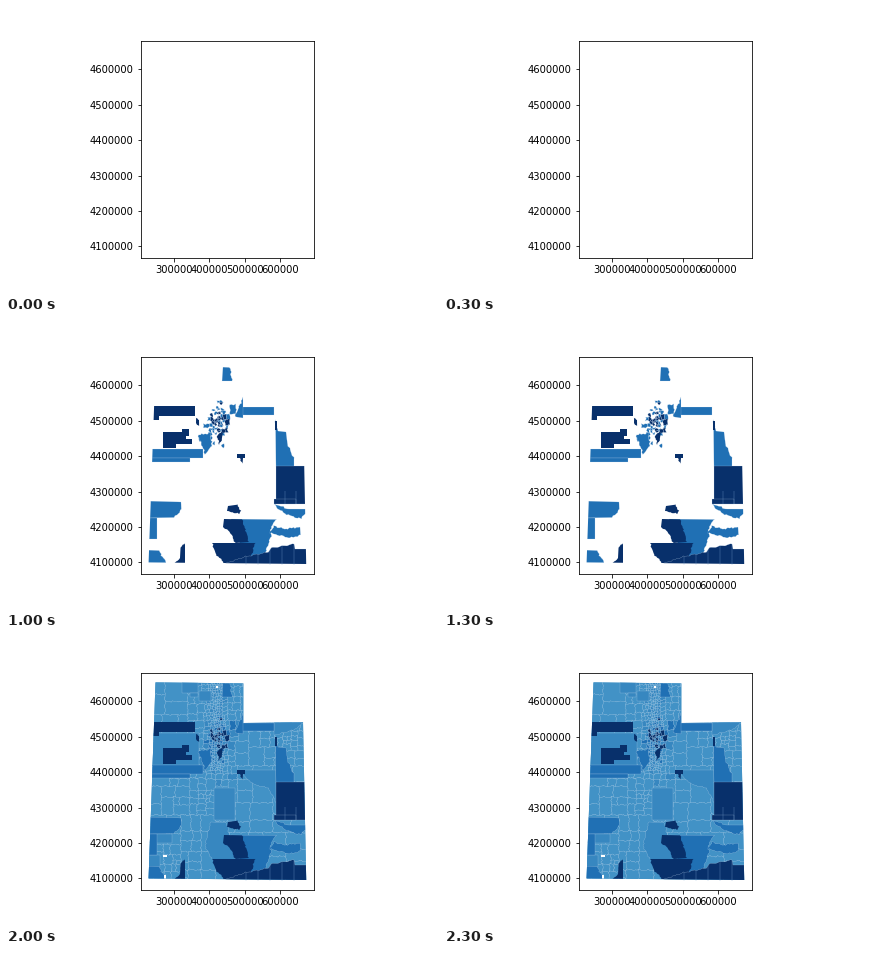
Animation of 432 by 288 pixels, one loop 2500 ms. Source, as a matplotlib script:

```python
import numpy as np
import matplotlib.pyplot as plt
from matplotlib.animation import FuncAnimation
from matplotlib.patches import Polygon

plt.rcParams.update({"font.family": "DejaVu Sans", "font.size": 10})
rng = np.random.default_rng(12)

# One shade is added per step: darkest first, palest last.
SHADES = {1: "#08306b", 2: "#2070b4", 3: "#3787c0", 4: "#4292c6"}
SEAM = "#c6dbef"
layers = {step: [] for step in SHADES}

# Axes units are stage pixels; tick labels carry the projected coordinates.
LEFT, RIGHT, TOP, BOTTOM = 134.75, 308.05, 34.56, 252
TICK = 35.373
fig = plt.figure(figsize=(6, 4), dpi=72, facecolor="white")
ax = fig.add_axes([LEFT / 432, 1 - BOTTOM / 288,
                   (RIGHT - LEFT) / 432, (BOTTOM - TOP) / 288])
ax.set(xlim=(LEFT, RIGHT), ylim=(BOTTOM, TOP))
ax.set_xticks([167.89 + TICK * k for k in range(4)],
              [str(300000 + 100000 * k) for k in range(4)])
ax.set_yticks([240.26 - TICK * k for k in range(6)],
              [str(4100000 + 100000 * k) for k in range(6)])

state = Polygon([(149.5, 44.4), (237.3, 45.4), (237.3, 85), (297, 84.3),
                 (300.2, 242), (142.6, 240.4)], color=SHADES[4], lw=0, zorder=0.05)
layers[4].append(ax.add_patch(state))


def wiggle(p):
    """Shift points by a fixed field, so that neighbours keep shared borders."""
    x, y = p.T
    return p + 0.45 * np.column_stack([np.sin(1.7 * y + x) + np.sin(0.8 * y),
                                       np.sin(1.5 * x - y) + np.sin(0.7 * x)])


def border(points, straight):
    """Follow the corners; slanted edges, or all of them, become ragged."""
    pts = np.array(points, float)
    out = []
    for a, b in zip(pts, np.roll(pts, -1, axis=0)):
        edge = a + (b - a) * np.arange(0, 1, 1 / (1 + int(np.hypot(*(b - a)) / 2)))[:, None]
        slanted = min(abs(b - a)) > 1.5
        out.append(wiggle(edge) if slanted or not straight else edge[:1])
    return np.vstack(out)


def area(step, points, z=None, straight=True, lw=0.2):
    patch = Polygon(border(points, straight), facecolor=SHADES[step],
                    edgecolor=SEAM, linewidth=lw, zorder=z or 0.8 - step / 10)
    layers[step].append(ax.add_patch(patch))
    patch.set_clip_path(state)
    return patch


def box(x0, y0, x1, y1):
    return [(x0, y0), (x1, y0), (x1, y1), (x0, y1)]


def corridor(x, y):
    """Distance from the chain of towns that runs north to south."""
    return np.hypot(max(abs(x - 211) - 4, 0), max(abs(y - 88) - 42, 0))


def tract_size(x, y):
    towns = [(170, 227), (200, 160), (282, 102)]
    near = min(np.hypot(x - a, y - b) for a, b in towns)
    return min(26, 3.2 + 0.55 * corridor(x, y), 6 + 0.4 * near)


def tract_step(x, y):
    """Tracts are darker towards the city, and pale away from the towns."""
    city = np.hypot((x - 213) / 11, (y - 100) / 9)
    odds = [0.45 * np.exp(-city ** 2), 0.4 * np.exp(-(city / 1.6) ** 2),
            0.5 * np.exp(-(corridor(x, y) / 12) ** 2)]
    return 1 + int(np.searchsorted(np.cumsum(odds), rng.random()))


def tracts(x0, y0, x1, y1):
    """Halve a rectangle until its parts fit the local tract size."""
    w, h = x1 - x0, y1 - y0
    x, y = (x0 + x1) / 2, (y0 + y1) / 2
    if max(w, h) < tract_size(x, y):
        area(tract_step(x, y), box(x0, y0, x1, y1), 0.1, straight=False)
        return
    cut = rng.uniform(0.35, 0.65)
    if w > h:
        tracts(x0, y0, x0 + w * cut, y1)
        tracts(x0 + w * cut, y0, x1, y1)
    else:
        tracts(x0, y0, x1, y0 + h * cut)
        tracts(x0, y0 + h * cut, x1, y1)


tracts(140, 42, 302, 244)

# Large areas; paler ones run on beneath darker ones, and the state trims them.
for shape in [
    box(140, 95, 193, 128), box(176, 44, 192, 55), box(184, 55, 192, 59),
    box(193, 53, 205, 63), box(208, 150, 229, 182), box(140, 196, 166, 205),
    box(140, 217, 154, 229),
    [(232, 132), (270, 132), (270, 164), (262, 150), (247, 146)],
    [(268, 84), (298, 84), (288, 92), (268, 97)],
    [(205, 184), (220, 184), (230, 221), (206, 222), (199, 207)],
]:
    area(3, shape)

for shape in [
    box(140, 127, 197, 136), box(140, 136, 184, 140.5),
    box(140, 196, 151.5, 217), box(235, 85, 268, 93),
    [(140, 179), (175, 180), (176, 187), (168, 195.5), (140, 196)],
    [(217, 45), (224, 45), (226, 59), (216, 59)],
    [(237, 75), (237, 96), (229, 95)],
    [(269, 98), (272, 109), (280, 110), (281, 121), (288, 137), (288, 145), (270, 145)],
    [(225, 197), (270, 197), (264, 208), (265, 214), (256, 240), (240, 240)],
    [(268, 182), (283, 187), (302, 187), (295, 197), (277, 191)],
    [(268, 204), (278, 207), (294, 205), (294, 213), (284, 216), (264, 211)],
    [(192, 113), (204, 111), (206, 124), (199, 132)],
    [(140, 228), (153, 228), (160, 241), (140, 241)],
]:
    area(2, shape)

for shape in [
    box(140, 83.8, 189.5, 94.5), box(140, 94, 153, 98.5),
    box(157.5, 110, 180, 122), box(157, 122, 170, 126.5), box(176, 107, 183, 114),
    box(180, 117, 186, 122), box(231, 132, 239, 136), box(269, 99, 271, 108),
    [(190, 95), (193, 98), (193, 104), (190, 101)],
    [(233, 135), (237, 136), (237, 141)],
    [(222, 184), (231, 183), (235, 188), (233, 192), (221, 189)],
    [(218, 197), (236, 197), (243, 220), (229, 221), (225, 211), (217, 205)],
    [(206, 221), (249, 221), (246, 232), (238, 241), (218, 241), (210, 232)],
    [(179, 221), (179, 242), (168, 242), (174, 236), (175, 226)],
    [(211, 113), (217, 109), (216, 117), (213, 123)],
]:
    area(1, shape, lw=0)

plateau = area(1, box(270, 144.5, 302, 182.5))
area(1, box(268, 177, 290, 182.5), 0.75)
south = area(1, [(218, 242), (238, 235), (262, 230), (266, 226), (288, 222),
                 (289, 227), (302, 227), (302, 243)])
for patch, xs, ys in [(south, range(240, 300, 12), (220, 243)),
                      (plateau, range(279, 300, 11), (169, 183))]:
    lines = ax.vlines(xs, *ys, color="#6f9bcb", lw=0.35, zorder=0.78)
    lines.set_clip_path(patch)
    layers[1].append(lines)

# Gaps left open inside the state
for gap in [box(157, 217, 161, 219), box(158, 237, 160.5, 242), box(210, 48, 212, 50)]:
    area(4, gap, 0.9, lw=0).set_facecolor("white")


def draw(frame):
    for step, artists in layers.items():
        for artist in artists:
            artist.set_visible(frame >= step)
    return []


anim = FuncAnimation(fig, draw, frames=5, interval=500, repeat=True)
plt.show()
```
